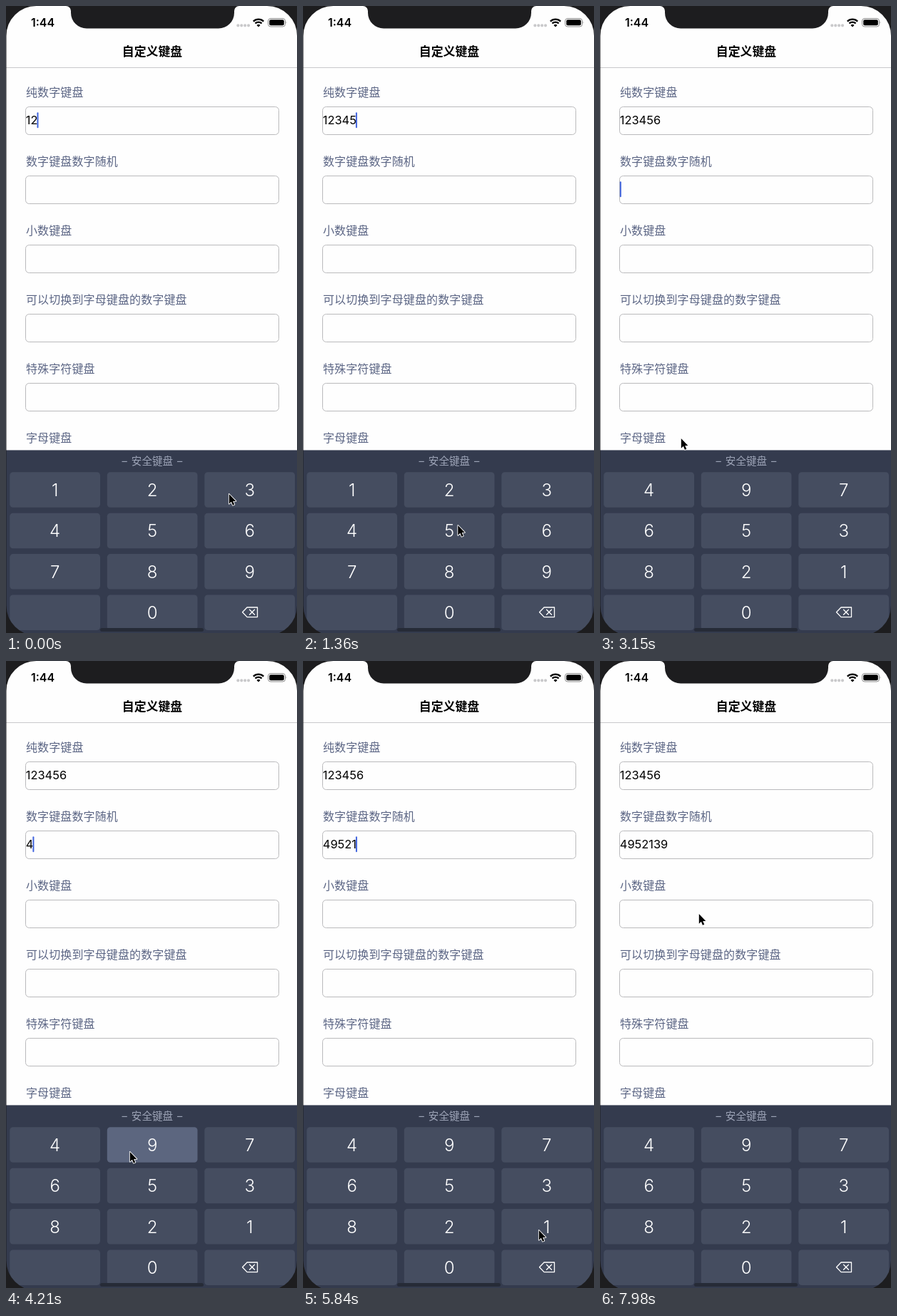
Animation of 408x880 px, one loop 8 s. Source, as an HTML page:

```html
<!DOCTYPE html>
<html lang="zh-CN">
<head>
<meta charset="utf-8">
<style>
  html, body { margin: 0; width: 100%; height: 100%; overflow: hidden; background: #fefefe; }
  svg { display: block; width: 408px; height: 880px; font-family: Inter, "Noto Sans CJK SC", "Noto Sans CJK", sans-serif; }
  .label { font-size: 16px; letter-spacing: .12px; fill: #5c6685; }
  .field { fill: none; stroke: #bababc; }
  .value { font-size: 16.4px; fill: #000; }
  .digit { font-size: 24px; font-weight: 300; fill: #fff; text-anchor: middle; }
</style>
</head>
<body>
<svg viewBox="0 0 408 880">
  <rect width="408" height="880" fill="#fefefe"/>
  <text x="35" y="29.3" font-size="16" font-weight="600">1:44</text>
  <path d="M325.3 27.3H341" stroke="#c9c9cb" stroke-width="4.2" stroke-linecap="round" stroke-dasharray="0 4.9"/>
  <path d="M346.8 21.6A10.4 10.4 0 0 1 361.2 21.6M349.4 24.4A6.6 6.6 0 0 1 358.6 24.4" fill="none" stroke="#000" stroke-width="2.2"/>
  <path d="M354 29.6L351.5 27A3.5 3.5 0 0 1 356.5 27Z"/>
  <rect x="367.5" y="17.5" width="24" height="11.5" rx="3.5" fill="none" stroke="#8c8c8c"/>
  <rect x="369.2" y="19.2" width="20.6" height="8.1" rx="2"/>
  <path d="M392.6 21.3q1.8 2 0 4z" fill="#8c8c8c"/>
  <text x="205" y="70.3" font-size="16.9" font-weight="600" text-anchor="middle">自定义键盘</text>
  <path d="M0 86.5H408" stroke="#c9c9cb"/>
  <g id="form"></g>
  <rect id="caret" width="2" height="22" rx="1" fill="#4064de"/>
  <rect y="623.4" width="408" height="257" fill="#343b4e"/>
  <text x="205" y="644.4" font-size="14.6" word-spacing="1.8" fill="#9ca3b6" text-anchor="middle">– 安全键盘 –</text>
  <g id="keys"></g>
  <g fill="none" stroke="#fff" stroke-width="1.3" stroke-linejoin="round" stroke-linecap="round">
    <path d="M331.5 850.8L338 844H352.5V857.6H338Z"/>
    <path d="M341.5 847.3l7 7m0-7l-7 7"/>
  </g>
  <rect x="132" y="873" width="145" height="5" rx="2.5" fill="#262b37"/>
  <rect x="-9.5" y="-10" width="427.5" height="903.5" rx="52" fill="none" stroke="#1d1d1f" stroke-width="20"/>
  <path fill="#1d1d1f" d="M84 0A7 7 0 0 1 91 7V9.5A22 22 0 0 0 113 31.5H298A22 22 0 0 0 320 9.5V7A7 7 0 0 1 327 0Z"/>
  <g id="pointer">
    <path d="M0 0V15.2L3.4 12L5.7 17.4L8.3 16.3L6 11H10.6Z" transform="translate(.8 1) scale(.9)" fill="#000" stroke="#fff" stroke-width="2" paint-order="stroke" stroke-linejoin="round"/>
  </g>
</svg>
<script>
const LOOP = 8000, SHUFFLE = 2710;   // the second field takes focus at SHUFFLE
const PRESS = 150, TRAVEL = 500;     // ms a key is held, longest pointer move
const KEY = { x: 5.3, y: 654.3, w: 126.7, h: 49.5, dx: 136.5, dy: 57.4 };
const $ = id => document.getElementById(id);

function add(parent, tag, attrs, text = '') {
  const el = document.createElementNS('http://www.w3.org/2000/svg', tag);
  for (const name in attrs) el.setAttribute(name, attrs[name]);
  el.textContent = text;
  return parent.appendChild(el);
}

const labels = ['纯数字键盘', '数字键盘数字随机', '小数键盘', '可以切换到字母键盘的数字键盘', '特殊字符键盘', '字母键盘'];
labels.forEach((text, i) => {
  const y = i * 97;
  add($('form'), 'text', { class: 'label', x: 28, y: y + 126.5 }, text);
  add($('form'), 'rect', { class: 'field', x: 27.5, y: y + 141.5, width: 355, height: 39, rx: 5 });
});
const values = [0, 1].map(i => add($('form'), 'text', { class: 'value', x: 27.8, y: 166.3 + i * 97 }));

const keys = Array.from({ length: 12 }, (_, i) => {
  const x = KEY.x + i % 3 * KEY.dx, y = KEY.y + Math.floor(i / 3) * KEY.dy;
  return {
    box: add($('keys'), 'rect', { x, y, width: KEY.w, height: KEY.h, rx: 4.5 }),
    digit: add($('keys'), 'text', { class: 'digit', x: x + KEY.w / 2, y: y + 33.4 })
  };
});
const layouts = ['123456789 0 ', '497653821 0 '];

// Pointer stops as [release time, x, y]; a stop over a key presses it.
const taps = [
  [210, 312, 684], [800, 66, 733], [1340, 215, 728], [1800, 328, 733],
  [2590, 113, 262], [3150, 113, 606],
  [3860, 110, 676], [4360, 173, 688], [4770, 195, 733], [5200, 200, 786],
  [5780, 330, 798], [6800, 324, 731], [7310, 190, 688], [8130, 138, 354]
].map(([up, x, y]) => ({
  up, x, y, down: up - PRESS,
  key: y < KEY.y ? -1 : Math.floor((y - KEY.y) / KEY.dy) * 3 + Math.floor((x - KEY.x) / KEY.dx)
}));

function pointerAt(t) {
  const i = taps.findIndex(tap => t <= tap.up), to = taps[i], from = taps[i - 1] || to;
  const leave = Math.max(from.up, to.down - TRAVEL);
  const p = from === to ? 1 : Math.min(1, Math.max(0, (t - leave) / (to.down - leave)));
  const e = p * p * (3 - 2 * p);
  return [from.x + (to.x - from.x) * e, from.y + (to.y - from.y) * e];
}

function caretOpacity(age) {
  const phase = age % 1000;
  return phase < 500 ? 1 : Math.max(0, 1 - (phase - 500) / 80);
}

function draw(t) {
  const active = t < SHUFFLE ? 0 : 1;
  const texts = ['12', ''];
  let lastEdit = active ? SHUFFLE : -250, held = -1;
  for (const { down, up, key } of taps) {
    if (key < 0) continue;
    if (t >= up) {
      const field = up < SHUFFLE ? 0 : 1;
      texts[field] += layouts[field][key];
      lastEdit = Math.max(lastEdit, up);
    } else if (t >= down) held = key;
  }
  values.forEach((el, i) => el.textContent = texts[i]);
  keys.forEach(({ box, digit }, i) => {
    digit.textContent = layouts[active][i].trim();
    box.setAttribute('fill', i === held ? '#5c667f' : '#454d60');
  });
  const width = texts[active] ? values[active].getComputedTextLength() : 0;
  $('caret').setAttribute('x', Math.max(27.8, 26.8 + width));
  $('caret').setAttribute('y', 149.3 + active * 97);
  $('caret').setAttribute('opacity', caretOpacity(t - lastEdit));
  $('pointer').setAttribute('transform', `translate(${pointerAt(t)})`);
}

const start = performance.now();
function tick() {
  draw((performance.now() - start) % LOOP);
  requestAnimationFrame(tick);
}
tick();
</script>
</body>
</html>
```
